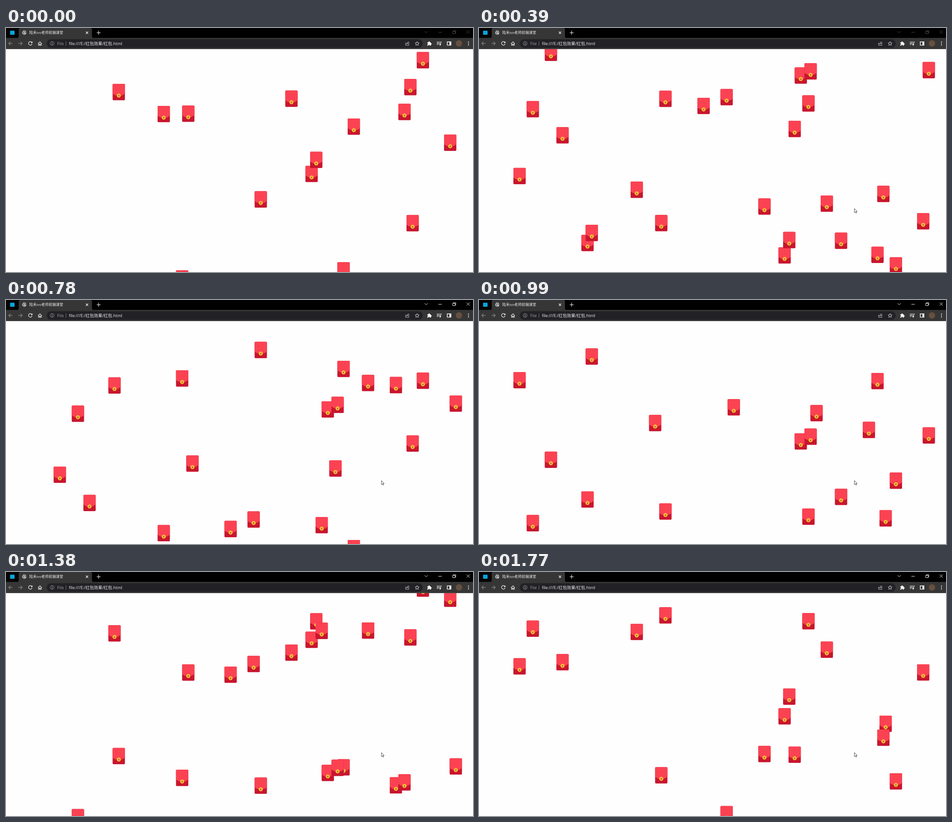
Write an HTML page that moves like this. It is 1032 px wide and 542 px high and loops after 1800 ms.

```html
<!DOCTYPE html>
<html lang="zh-CN">
<head>
<meta charset="utf-8">
<title>红包</title>
<style>
  html, body { margin: 0; width: 100%; height: 100%; overflow: hidden; background: #fefefe; }
  svg { display: block; width: 1032px; height: 542px; }
  text { font-family: "Open Sans", "Noto Sans CJK SC", "Noto Sans CJK", sans-serif; }
  .line { fill: none; stroke: #eee; stroke-width: 1.2; }
  .gray { stroke: #87888a; }
  .thin { stroke-width: 0.9; }
</style>
</head>
<body>
<svg viewBox="0 0 1032 542">
  <defs>
    <g id="envelope">
      <rect width="27.2" height="36.3" rx="2" fill="#c8162e"/>
      <path d="M0 2Q0 0 2 0H25.2Q27.2 0 27.2 2V21.6Q13.6 32 0 21.6Z" fill="#fb4252"/>
      <circle cx="13.6" cy="26" r="4.4" fill="#fdc83c"/>
      <path d="M11.8 23.6L13.6 25.8L15.4 23.6M13.6 25.8V28.6M11.8 26H15.4M11.8 27.3H15.4" fill="none" stroke="#9c5a1c" stroke-width=".8"/>
    </g>
  </defs>

  <g id="rain"></g>

  <!-- tab strip -->
  <rect width="1032" height="23" fill="#000"/>
  <rect width="27" height="22" rx="3" fill="#050505"/>
  <rect x="9" y="6" width="10" height="9" rx="1.5" fill="#0aa5dc"/>
  <path d="M24 22.5Q28 22.5 28 18V4Q28 0 32 0H186Q190 0 190 4V18Q190 22.5 194 22.5Z" fill="#363636"/>
  <circle cx="40.5" cy="10.3" r="4.7" fill="#c4c6c8"/>
  <path d="M37 8.5Q39 9 39 11T41 14M40.5 6.5Q40 9 42.5 9T44 11.5" fill="none" stroke="#484848" stroke-width="1.3"/>
  <text x="51.5" y="13.2" font-size="8" fill="#eee">陆禾ivo老师前端课堂</text>
  <path class="line" d="M176.5 8L181.5 13M181.5 8L176.5 13"/>
  <path class="line" d="M200.5 10.5H209M204.7 6.3V14.8"/>
  <path id="controls" class="line thin" d="M925 7.2L928.5 10.8L932 7.2M955.5 9.5H963M987 7.5H992.5V12.5H987ZM988.5 7.3V6H994V11H992.7M1018 5.5L1025 12.5M1025 5.5L1018 12.5"/>

  <!-- toolbar -->
  <rect y="22" width="1032" height="25" fill="#363636"/>
  <rect y="46" width="1032" height="1" fill="#505050"/>
  <rect x="90" y="25" width="831" height="19" rx="9.5" fill="#222125"/>
  <path class="line gray" d="M14.5 34.3H6M10 30.3L6 34.3L10 38.3M27.5 34.3H36M32 30.3L36 34.3L32 38.3"/>
  <path class="line" d="M57.2 32A4 4 0 1 0 57.6 35.3M57.8 30V32.8H55"/>
  <path class="line" d="M70.8 34.8L75 30.6L79.2 34.8M72 34V38.4H74V35.8H76V38.4H78V34"/>
  <circle class="line thin" cx="102" cy="34.3" r="4.1" style="stroke:#aaa"/>
  <path class="line" d="M102 33.8V36.7M102 31.7V32.8" style="stroke:#bbb"/>
  <text x="113" y="37.7" font-size="9.25" fill="#9aa0a6">File</text>
  <path class="line thin" d="M132.5 29.5V39.5" style="stroke:#777"/>
  <text x="139" y="37.7" font-size="9.25" fill="#f0f0f0">file:///E:/红包效果/红包.html</text>
  <path class="line thin" d="M883 32.5V38.5H890.5V36.5M884.5 36Q885 32.5 888.5 32.5V30.5L891.5 33.5L888.5 36V34.2Q886 34.2 884.5 36Z" style="stroke:#c4c4c4"/>
  <path class="line thin" d="M908.5 30L909.8 33L913 33.3L910.6 35.4L911.3 38.6L908.5 36.9L905.7 38.6L906.4 35.4L904 33.3L907.2 33Z"/>
  <path d="M931 32H933.3Q933.3 29.8 935 29.8T936.7 32H939V34.2Q940.8 34.2 940.8 35.6T939 37V39H936.6Q936.6 37.3 935 37.3T933.4 39H931V36.7Q932.8 36.7 932.8 35.4T931 34Z" fill="#fff"/>
  <path class="line" d="M952 31H959M952 33.7H959M952 36.4H956M960.5 37V31H963"/>
  <circle cx="959.3" cy="37" r="1.7" fill="#eee"/>
  <path d="M974.5 30H984V38.8H974.5ZM975.9 31.4V37.4H980V31.4Z" fill="#fff" fill-rule="evenodd"/>
  <circle cx="1001" cy="34.3" r="7" fill="#67503f"/>
  <path d="M1022 30.8h0M1022 34.3h0M1022 37.8h0" stroke="#eee" stroke-width="2.2" stroke-linecap="round"/>

  <path id="cursor" d="M0 0V9L2 7.2L3.4 10.2L4.8 9.6L3.4 6.6H6Z" fill="#fff" stroke="#222" stroke-width=".8"/>
</svg>

<script>
const LOOP = 1800, STEP = 30;
const TOP = -22, FALL = 777;

// All envelopes were released together and fall at constant speeds, over and over.
// Each one: left edge, and how many falls it has made when the loop begins.
const envelopes = [
  [76, 5.864], [105.3, 2.953], [145.3, 2.806], [171, 3.021], [226.2, 6.951],
  [235.6, 4.188], [335, 2.251], [375.7, 2.721], [389.2, 3.25], [398.4, 2.926],
  [482.7, 4.769], [533.6, 4.746], [549.4, 3.495], [617.2, 3.207], [661.7, 2.422],
  [672, 2.382], [684, 3.917], [697.5, 1.953], [714.4, 2.938], [732.3, 2.698],
  [719.2, 1.942], [755, 2.287], [786.5, 6.945], [848, 2.737], [867, 4.245],
  [885, 4.563], [880, 3.174], [907.7, 6.097], [968, 2.333], [980.4, 1.939]
];

// Time since the release, where 1 is the loop's beginning; it runs slower in the middle.
const age = [[0, 1], [540, 1.1332], [1530, 1.3542], [1770, 1.4111]];
const cursorPath = [[90, 975, 546], [210, 895, 444], [390, 829.7, 401]];

// Linear interpolation of one column of a keyed list.
function along(keys, t, column = 1) {
  const next = keys.findIndex(key => key[0] >= t);
  if (next < 0) return keys[keys.length - 1][column];
  if (next === 0) return keys[0][column];
  const a = keys[next - 1], b = keys[next];
  return a[column] + (b[column] - a[column]) * (t - a[0]) / (b[0] - a[0]);
}

const rain = document.getElementById('rain');
const controls = document.getElementById('controls');
const cursor = document.getElementById('cursor');
const place = (node, x, y) => node.setAttribute('transform', `translate(${x} ${y})`);

const sprites = envelopes.map(() => {
  const use = document.createElementNS('http://www.w3.org/2000/svg', 'use');
  use.setAttribute('href', '#envelope');
  return rain.appendChild(use);
});

function draw(now) {
  const t = Math.floor((now % LOOP) / STEP) * STEP;
  const elapsed = along(age, t);
  envelopes.forEach(([x, falls], i) => place(sprites[i], x, TOP + FALL * (falls * elapsed % 1)));
  place(cursor, along(cursorPath, t), along(cursorPath, t, 2));
  controls.style.stroke = t < 420 ? '#505050' : '#fff';
}

const start = performance.now();
function tick() {
  draw(performance.now() - start);
  requestAnimationFrame(tick);
}
tick();
</script>
</body>
</html>
```
